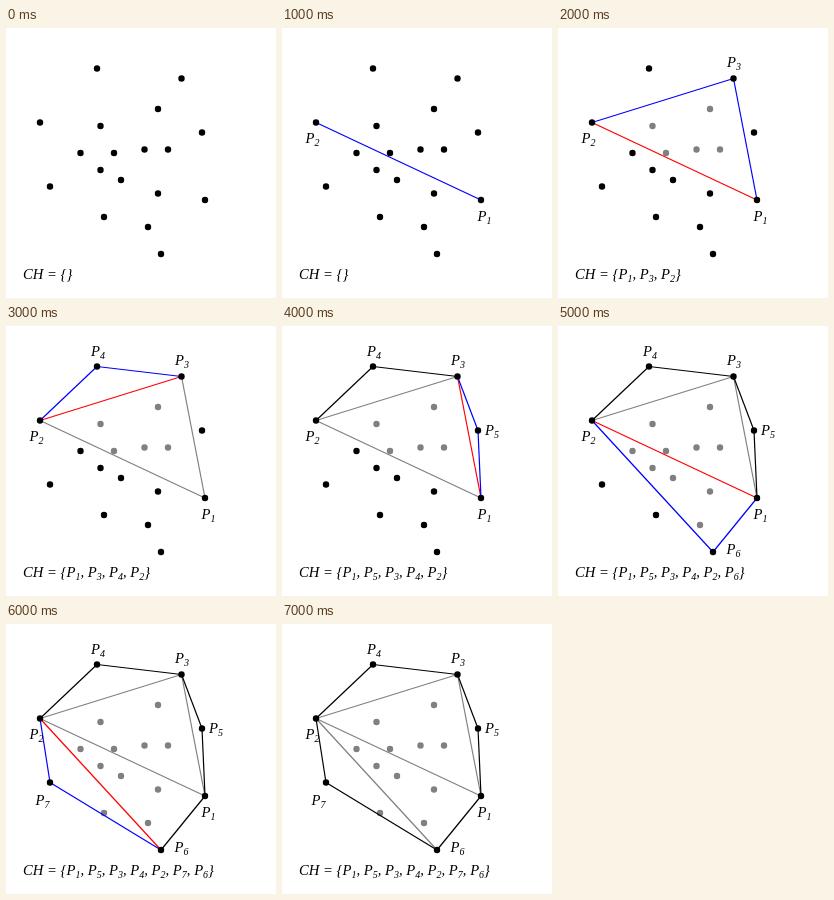
Recreate the animation shown at these times as an HTML page. Size 270x270 px, loop 9 s.

```html
<!DOCTYPE html>
<html lang="en">
<head>
<meta charset="utf-8">
<title>Quickhull</title>
<style>
  html, body { margin: 0; width: 100%; height: 100%; overflow: hidden; background: #fff; }
  svg { display: block; width: 100%; height: 100%; }
  text { font: italic 14.67px "Liberation Serif", "Times New Roman", serif; white-space: pre; }
  .sub { font-size: 10px; }
  line { stroke-width: 1.2; }
</style>
</head>
<body>
<svg viewBox="0 0 270 270"></svg>
<script>
const svg = document.querySelector('svg');
const GRAY = '#808080', RED = '#f00', BLUE = '#00f', BLACK = '#000';

// Hull points: x, y, label x, label baseline
const hull = {
  1: [199, 172, 195.5, 192.5],
  2: [34, 94.5, 23.5, 115],
  3: [175.5, 50.5, 169, 38.5],
  4: [91, 40.5, 85, 29.5],
  5: [196, 104.5, 203, 108.5],
  6: [155, 226, 168.5, 228],
  7: [44, 158.5, 29.5, 180.5]
};

// Inner points: x, y, step at which they are discarded
const inner = [
  [152, 81, 2], [94.5, 98, 2], [108, 125, 2], [138.5, 121.5, 2], [162, 121.5, 2],
  [74.5, 125, 5], [94.5, 142, 5], [115, 152, 5], [152, 165.5, 5], [142, 199, 5],
  [98, 189, 6]
];

// Edge lists per step, one pair of point numbers per edge
const steps = [
  { ch: '', named: '' },
  { ch: '', named: '12', blue: '12' },
  { ch: '132', red: '12', blue: '23 31' },
  { ch: '1342', gray: '12 31', red: '23', blue: '24 43' },
  { ch: '15342', gray: '12 23', black: '24 43', red: '31', blue: '35 51' },
  { ch: '153426', gray: '23 31', black: '24 43 35 51', red: '12', blue: '26 61' },
  { ch: '1534276', gray: '12 23 31', black: '24 43 35 51 61', red: '26', blue: '27 76' },
  { ch: '1534276', gray: '12 23 31 26', black: '24 43 35 51 61 27 76' }
];

function add(parent, tag, attrs, content = '') {
  const el = document.createElementNS('http://www.w3.org/2000/svg', tag);
  for (const key in attrs) el.setAttribute(key, attrs[key]);
  el.textContent = content;
  return parent.appendChild(el);
}

const dot = (g, x, y, fill) => add(g, 'circle', { cx: x, cy: y, r: 3.2, fill });

function edges(g, list = '', stroke) {
  for (const [a, b] of list.split(' ').filter(Boolean)) {
    const [x1, y1] = hull[a], [x2, y2] = hull[b];
    add(g, 'line', { x1, y1, x2, y2, stroke });
  }
}

function pointName(text, n) {
  add(text, 'tspan', {}, 'P');
  add(text, 'tspan', { class: 'sub', dy: 3.3 }, n);
}

function drawStep(step, index) {
  const g = add(svg, 'g', { visibility: 'hidden' });
  for (const [x, y, gone] of inner) dot(g, x, y, index >= gone ? GRAY : BLACK);

  edges(g, step.gray, GRAY);
  edges(g, step.black, BLACK);
  edges(g, step.red, RED);
  edges(g, step.blue, BLUE);

  for (const n in hull) dot(g, hull[n][0], hull[n][1], BLACK);
  for (const n of step.named ?? step.ch) {
    pointName(add(g, 'text', { x: hull[n][2], y: hull[n][3] }), n);
  }

  const caption = add(g, 'text', { x: 17, y: 250.8 });
  add(caption, 'tspan', {}, 'CH = {');
  [...step.ch].forEach((n, i) => {
    if (i) add(caption, 'tspan', { dy: -3.3 }, ', ');
    pointName(caption, n);
  });
  add(caption, 'tspan', { dy: step.ch ? -3.3 : 0 }, '}');
  return g;
}

const groups = steps.map(drawStep);
const start = performance.now();

function render() {
  const t = Math.max(0, performance.now() - start) % 9000;
  const current = Math.min(Math.floor(t / 1000), groups.length - 1);
  groups.forEach((g, i) => g.setAttribute('visibility', i === current ? 'visible' : 'hidden'));
  requestAnimationFrame(render);
}
render();
</script>
</body>
</html>
```
